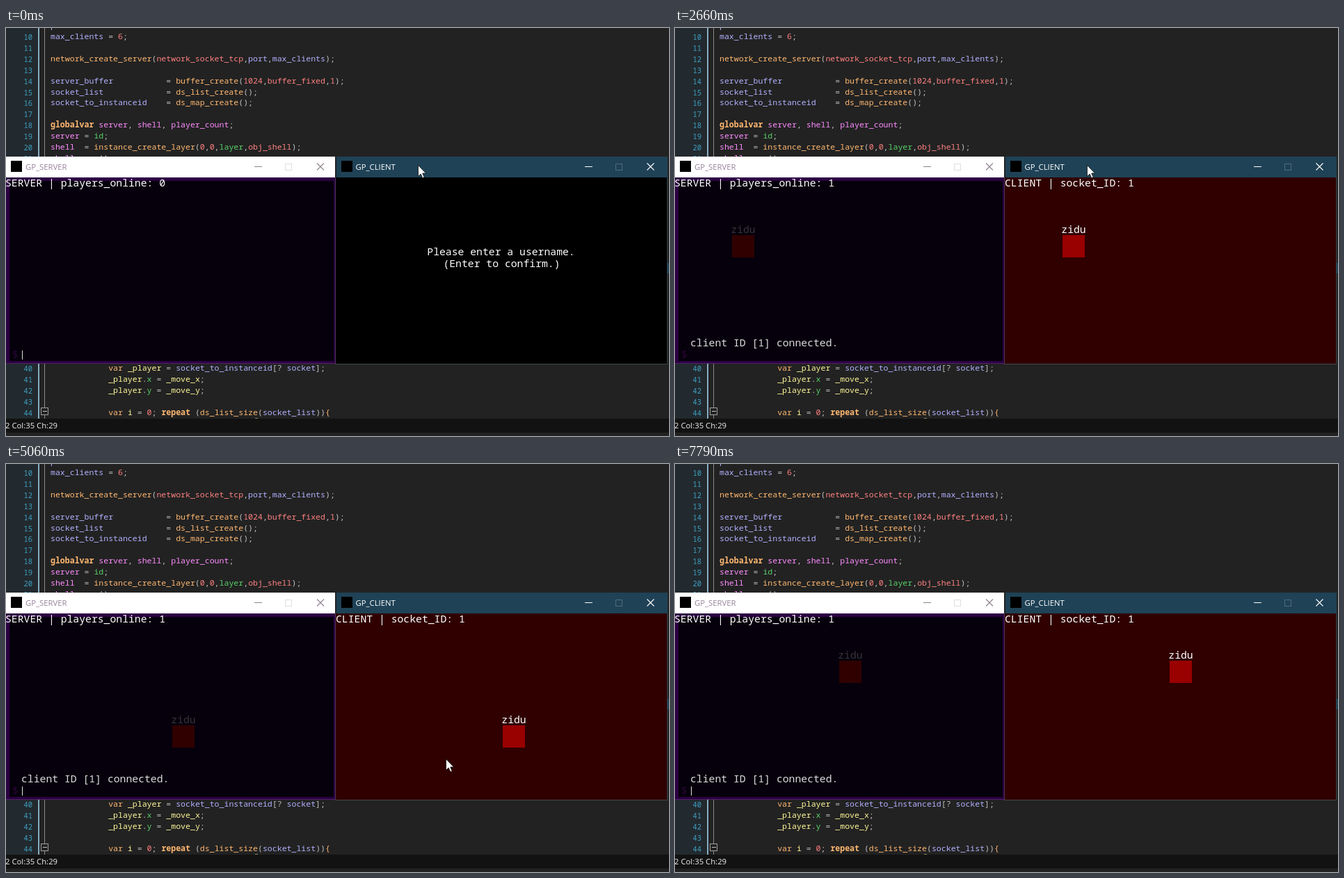
Write an HTML page that moves like this. It is 953x587 px and loops after 8000 ms.

```html
<!DOCTYPE html>
<html lang="en">
<head>
<meta charset="utf-8">
<title>Server and client</title>
<style>
html, body { margin: 0; width: 100%; height: 100%; overflow: hidden; background: #222; }
svg { display: block; width: 953px; height: 587px; }
text { white-space: pre; }
rect, line { shape-rendering: crispEdges; }
.code { font: 11.55px "Noto Sans Mono", "DejaVu Sans Mono", monospace; fill: #c0c0c0; }
.num { font-size: 10.5px; fill: #3f9fc0; text-anchor: end; }
.game { font: 300 14.75px "Noto Sans Mono", "DejaVu Sans Mono", monospace; fill: #fff; }
.mid { text-anchor: middle; }
.ui { font: 11.3px "Open Sans", "Noto Sans", sans-serif; }
</style>
</head>
<body>
<svg id="stage" viewBox="0 0 953 587"></svg>
<script>
const stage = document.getElementById("stage");
const LOOP = 8000, JOINED = 2660, SERVER_SHIFT = -475;
const USER = "zidu";

function add(tag, attrs, parent = stage) {
  const el = document.createElementNS("http://www.w3.org/2000/svg", tag);
  for (const key in attrs) el.setAttribute(key, attrs[key]);
  parent.appendChild(el);
  return el;
}
const box = (x, y, width, height, fill, parent) => add("rect", { x, y, width, height, fill }, parent);
function label(x, y, text, cls, fill, parent) {
  const el = add("text", { x, y, class: cls }, parent);
  if (fill) el.style.fill = fill;
  el.textContent = text;
  return el;
}
const show = (el, visible) => el.setAttribute("visibility", visible ? "visible" : "hidden");

// Code editor
const WORDS = {
  "#ffb871": ["var", "repeat", "globalvar"],
  "#ff8080": ["network_socket_tcp", "buffer_fixed", "obj_shell"],
  "#58d068": ["id", "layer", "x", "y"],
  "#ff8cff": ["server", "shell", "player_count"]
};
const BOLD = ["repeat", "globalvar"];
const CODE = {
  9: "port",
  10: "max_clients = 6;",
  12: "network_create_server(network_socket_tcp,port,max_clients);",
  14: "server_buffer           = buffer_create(1024,buffer_fixed,1);",
  15: "socket_list             = ds_list_create();",
  16: "socket_to_instanceid    = ds_map_create();",
  18: "globalvar server, shell, player_count;",
  19: "server = id;",
  20: "shell  = instance_create_layer(0,0,layer,obj_shell);",
  21: "shell.open();",
  40: "            var _player = socket_to_instanceid[? socket];",
  41: "            _player.x = _move_x;",
  42: "            _player.y = _move_y;",
  44: "            var i = 0; repeat (ds_list_size(socket_list)){"
};

function wordColor(word, next) {
  for (const color in WORDS) if (WORDS[color].includes(word)) return color;
  if (/^\d/.test(word)) return "#ff8080";
  if (/^_|^i$/.test(word)) return "#fff899";
  if (word === "{" || next === "(") return "#ffb871";
  return /^\w/.test(word) ? "#b2b1ff" : "#c0c0c0";
}

function codeLine(n) {
  const y = 16 + (n - 10) * 15.9;
  if (n > 9) label(38, y + 1, n, "code num");
  const line = add("text", { x: 64, y, class: "code" });
  const parts = (CODE[n] || "").match(/\w+|\{|[^\w{]+/g) || [];
  parts.forEach((part, i) => {
    const span = add("tspan", { fill: wordColor(part, (parts[i + 1] || "")[0]) }, line);
    if (BOLD.includes(part)) span.setAttribute("font-weight", "bold");
    span.textContent = part;
  });
}

box(0, 0, 953, 587, "#222222");
box(0, 0, 45, 562, "#222a2f");
box(46, 0, 2, 562, "#86aec4");
box(55, 0, 1, 562, "#8a8a8a");
for (let n = 9; n <= 44; n++) if (n < 22 || n > 39) codeLine(n);
add("rect", { x: 50.5, y: 546.5, width: 10, height: 10, fill: "#222", stroke: "#a0a0a0" });
box(53, 551, 6, 1, "#c0c0c0");
box(358, 561, 4, 1, "#8a8a60");
box(0, 562, 953, 21, "#121212");
box(0, 582, 953, 5, "#222222");
label(-1, 576, "2 Col:35 Ch:29", "ui", "#f0f0f0");
box(951, 338, 2, 15, "#1f4256");

// Window frames
function titleBar(x, width, title, colors) {
  box(x, 185, width, 30, colors.bar);
  box(x + 7, 191, 16, 16, "#000");
  label(x + 28, 204, title, "ui", colors.text);
  const right = x + 452;
  box(right - 95, 199, 11, 1, colors.icon);
  add("rect", { x: right - 50.5, y: 195.5, width: 9, height: 9, fill: "none", stroke: colors.dim });
  add("path", {
    d: `M${right - 5} 194.5l10 10m0-10l-10 10`, stroke: colors.icon, "stroke-width": 1.1, fill: "none"
  });
}
titleBar(0, 473, "GP_SERVER", { bar: "#fff", text: "#97819a", icon: "#8f838f", dim: "#e2dde2" });
titleBar(474.5, 476.5, "GP_CLIENT", { bar: "#1f4256", text: "#fff", icon: "#fff", dim: "#4f6c7b" });

box(0, 215, 473, 268, "#2c0042");
box(5, 220, 466, 259, "#06000c");
box(0, 482, 473, 1, "#51206a");
box(473, 215, 1, 269, "#4a3a55");
const room = box(474, 215, 476, 268, "#000");
box(950, 215, 1, 269, "#34434b");
box(474, 483, 477, 1, "#40484c");

// Server contents
const serverStatus = label(-1, 228, "", "game");
label(9, 475, "$", "game", "#2a0636");
const caret = box(23, 464, 1, 13, "#e0e0e0");

// Client contents before and after joining
const login = add("g", {});
label(711.5, 327, "Please enter a username.", "game mid", "", login);
label(712.5, 344, "(Enter to confirm.)", "game mid", "", login);
const typed = label(712, 389, "", "game mid", "", login);
typed.style.fontSize = "29.5px";

const session = add("g", {});
label(22, 458, "client ID [1] connected.", "game", "#dcdcdc", session);
label(474, 228, "CLIENT | socket_ID: 1", "game", "", session);

function makePlayer(body, nameColor) {
  const group = add("g", {}, session);
  box(-16, -16, 32, 32, body, group);
  label(0, -19, USER, "game mid", nameColor, group);
  return group;
}
const serverPlayer = makePlayer("#300000", "#353338");
const clientPlayer = makePlayer("#990000", "#fff");

const pointer = add("g", {});
const press = add("circle", { r: 12, fill: "#ffff00", "fill-opacity": 0.5 }, pointer);
add("path", {
  d: "M.5 .5V16.5L4.2 13L6.8 18.8L9.2 17.7L6.7 12H11.5Z",
  fill: "#fff", stroke: "#111", "stroke-width": 0.8
}, pointer);

// Timing
const KEYS = [440, 720, 1180, 1820];
const BLINKS = [490, 900, 1460, 1870, 2430, 2840, 3400, 3850, 4370, 4800, 5340, 5790, 6310, 6770, 7380, 7790];
const PRESSES = [[3680, 4300], [4800, 5000], [5750, 5950]];
const PLAYER_PATH = [
  [3630, 573, 314], [3910, 618, 374], [4420, 810, 322], [4500, 810, 322],
  [5060, 730, 392], [5340, 632, 424], [5420, 632, 424], [6100, 727, 299]
];
const POINTER_PATH = [
  [3220, 592, 197], [3400, 595, 345], [3600, 595, 345], [3910, 618, 374],
  [4300, 810, 322], [4480, 810, 322], [4900, 632, 424], [5290, 632, 424],
  [5750, 727, 299], [6210, 727, 299], [6260, 739, 305], [6490, 960, 330]
];

const passed = (times, t) => times.filter(time => time <= t).length;

// Slope through a point; zero at the ends and beside a rest.
function slope(path, i, axis) {
  const a = path[i - 1], b = path[i], c = path[i + 1];
  if (!a || !c || a[1] === b[1] || b[1] === c[1]) return 0;
  return (c[axis] - a[axis]) / (c[0] - a[0]);
}

function along(path, t) {
  const last = path.length - 1;
  if (t <= path[0][0]) return path[0].slice(1);
  if (t >= path[last][0]) return path[last].slice(1);
  const i = path.findIndex(p => p[0] > t) - 1;
  const a = path[i], b = path[i + 1], span = b[0] - a[0], u = (t - a[0]) / span;
  return [1, 2].map(axis => {
    const ease = u * u * (3 - 2 * u);
    return Math.round(a[axis] + (b[axis] - a[axis]) * ease +
      span * u * (1 - u) * (slope(path, i, axis) * (1 - u) - slope(path, i + 1, axis) * u));
  });
}

const place = (el, x, y) => el.setAttribute("transform", `translate(${x} ${y})`);

function render(t) {
  const joined = t >= JOINED;
  show(login, !joined);
  show(session, joined);
  room.setAttribute("fill", joined ? "#300000" : "#000");
  serverStatus.textContent = "SERVER | players_online: " + (joined ? 1 : 0);
  typed.textContent = USER.slice(0, passed(KEYS, t));
  show(caret, passed(BLINKS, t) % 2 === 0);

  const [x, y] = along(PLAYER_PATH, t);
  place(clientPlayer, x, y);
  place(serverPlayer, x + SERVER_SHIFT, y);

  place(pointer, ...along(POINTER_PATH, t));
  show(pointer, t < 6490);
  show(press, PRESSES.some(([from, to]) => t >= from && t < to));
}

const start = performance.now();
function tick() {
  render((performance.now() - start) % LOOP);
  requestAnimationFrame(tick);
}
tick();
</script>
</body>
</html>
```
